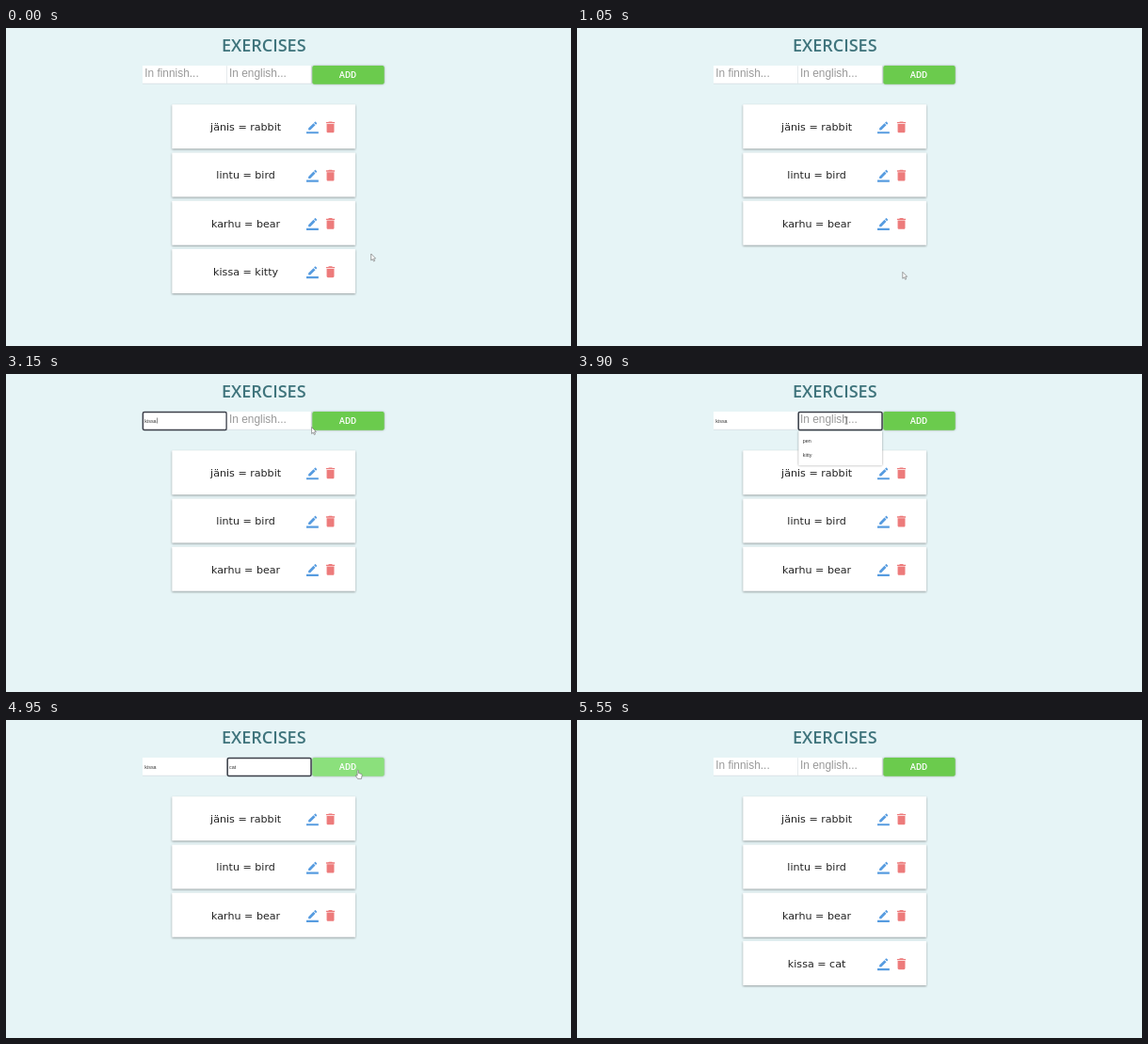
Recreate the animation shown at these times as an HTML page. Size 600x338 px, loop 5.58 s.

```html
<!DOCTYPE html>
<html lang="en">
<head>
<meta charset="utf-8">
<title>Exercises</title>
<style>
  html, body { margin: 0; width: 100%; height: 100%; overflow: hidden; background: #e6f4f6; }
  svg { display: block; width: 600px; height: 338px; }
  text { font-family: "Liberation Sans", Arial, sans-serif; }
  .title { font: 600 18px "Open Sans", sans-serif; fill: #3f747c; text-anchor: middle; }
  .add { font: 500 9.3px Roboto, sans-serif; fill: #fff; text-anchor: middle; }
  .word { font: 11.1px "DejaVu Sans", Verdana, sans-serif; fill: #222; text-anchor: middle; }
  .hint { font-size: 11.9px; fill: #999; }
  .small { font-size: 5.4px; fill: #333; }
  .card rect, .list rect { fill: #fff; filter: drop-shadow(.6px 1px 1.3px rgba(0, 0, 0, .36)); }
  .list rect { filter: drop-shadow(0 .4px .8px rgba(0, 0, 0, .4)); }
  .ring { fill: none; stroke: #3c404a; stroke-width: 1.5; }
  .pointer { fill: #fff; stroke: #777; stroke-width: .7; stroke-linejoin: round; }
</style>
</head>
<body>
<svg viewBox="0 0 600 338">
  <defs>
    <path id="pencil" d="M17.75 7 14 3.25l-10 10V17h3.75zM20.71 4.04c.39-.39.39-1.02 0-1.41L18.37.29c-.39-.39-1.02-.39-1.41 0L15 2.25 18.75 6zM0 20h24v4H0z"/>
    <path id="bin" d="M6 19c0 1.1.9 2 2 2h8c1.1 0 2-.9 2-2V7H6zM19 4h-3.5l-1-1h-5l-1 1H5v2h14z"/>
  </defs>
  <text class="title" x="273.8" y="24.5">EXERCISES</text>
  <g id="cards"></g>
  <g id="fields"></g>
  <rect id="button" x="325.3" y="40" width="76.4" height="19.8" rx="2" style="filter:drop-shadow(0 .6px .8px rgba(0,0,0,.3))"/>
  <text class="add" x="363" y="53.3">ADD</text>
  <path id="caret" d="M160.6 46.5v6" stroke="#333" stroke-width=".6"/>
  <g id="cursor">
    <path id="arrow" class="pointer" d="M0 0v7l1.6-1.4 1.2 2.4 1.1-.5-1.1-2.3 2-.2z"/>
    <path id="beam" d="M-1.5-3.5h3M0-3.5v7M-1.5 3.5h3" fill="none" stroke="#666" stroke-width=".8"/>
    <path id="hand" class="pointer" d="M-.7 0Q0-.8.7 0V3l3 .8q.8.3.6 1.4L3.6 9H-.2L-2.7 5.4q.3-1 2 .2z"/>
  </g>
</svg>
<script>
const LOOP = 5580;
const $ = id => document.getElementById(id);
const show = (el, on) => el.setAttribute("visibility", on ? "inherit" : "hidden");

const addCard = (words, i) => {
  $("cards").insertAdjacentHTML("beforeend", `<g class="card" transform="translate(0 ${81.2 + i * 51.3})">
    <rect x="176.3" width="194.7" height="47" rx=".5"/>
    <text class="word" x="254.6" y="27.8">${words}</text>
    <use href="#pencil" fill="#579ce0" transform="translate(319 18.3) scale(.535)"/>
    <use href="#bin" fill="#ed7b7b" transform="translate(336.6 16.2) scale(.66)"/></g>`);
  return $("cards").lastElementChild;
};

const addField = (x, hint, options) => {
  $("fields").insertAdjacentHTML("beforeend", `<g transform="translate(${x} 0)">
    <rect y="40" width="89.6" height="19" fill="#fff"/>
    <path d="M0 59.2h89.6m0-19v19" fill="none" stroke="#d5dcde" stroke-width=".7"/>
    <text class="hint" x="2.2" y="51.9">${hint}</text>
    <text class="small" x="2.3" y="51.6"></text>
    <rect class="ring" x=".4" y="40.4" width="88.8" height="19" rx="1.5"/>
    <g class="list"><rect x=".5" y="60.8" width="88.7" height="36.4" rx="1"/>
      ${options.map((o, i) => `<text class="small" x="5" y="${73 + i * 15.2}">${o}</text>`).join("")}</g></g>`);
  const g = $("fields").lastElementChild;
  const [hintEl, value] = g.querySelectorAll("text");
  return (text, focus, open) => {
    value.textContent = text;
    show(hintEl, !text);
    show(g.querySelector(".ring"), focus);
    show(g.querySelector(".list"), open);
  };
};

["jänis = rabbit", "lintu = bird", "karhu = bear"].forEach(addCard);
const kitty = addCard("kissa = kitty", 3);
const cat = addCard("kissa = cat", 3);
const finnish = addField(145, "In finnish...", ["kynä", "kissa"]);
const english = addField(234.8, "In english...", ["pen", "kitty"]);

// Pointer path: time, x, y
const path = [
  [0, 387.7, 240], [190, 387.7, 240], [690, 345, 258], [930, 345.8, 259.3], [1050, 345.8, 259.3],
  [1450, 190.5, 53.5], [2800, 190.5, 53.5], [3150, 324.6, 56.5], [3210, 325, 56.5], [3330, 334, 53],
  [3600, 286, 49.5], [3990, 286, 49.5], [4260, 292, 99], [4720, 292, 99], [4930, 373.8, 53.6],
  [5260, 373.8, 53.6], [5550, 388, 319]
];

const pointerAt = t => {
  const i = path.findIndex(p => p[0] > t);
  if (i < 0) return path.at(-1).slice(1);
  const [t0, x0, y0] = path[i - 1], [t1, x1, y1] = path[i];
  const u = (t - t0) / (t1 - t0), k = u * u * (3 - 2 * u);
  return [x0 + (x1 - x0) * k, y0 + (y1 - y0) * k];
};

const within = (t, a, b) => t >= a && t < b;
const typed = (word, times, t) => word.slice(0, times.filter(s => t >= s).length);

function draw(t) {
  const sent = t >= 5130;
  finnish(sent ? "" : typed("kissa", [2340, 2400, 2490, 2640, 2700], t),
    within(t, 1770, 3600), within(t, 2250, 2490));
  english(sent ? "" : typed("cat", [4500, 4530, 4560], t),
    within(t, 3600, 5130), within(t, 3900, 4500));
  show($("caret"), within(t, 2700, 3210));
  show(kitty, t < 900);
  show(cat, sent);

  const [x, y] = pointerAt(t);
  const inRow = y > 40 && y < 60;
  const onAdd = inRow && x > 326 && x < 402;
  const onBin = t < 900 && x < 350 && y > 250;
  const onField = inRow && x > 145 && x < 324;
  $("button").setAttribute("fill", onAdd ? "#8be07c" : "#6bcb4d");
  $("cursor").setAttribute("transform", `translate(${x} ${y})`);
  show($("cursor"), !within(t, 2340, 2800) && !within(t, 4500, 4740) && t < 5550);
  show($("hand"), onAdd || onBin);
  show($("beam"), onField);
  show($("arrow"), !onAdd && !onBin && !onField);
}

const start = performance.now();
function tick() {
  draw((performance.now() - start) % LOOP);
  requestAnimationFrame(tick);
}
tick();
</script>
</body>
</html>
```
